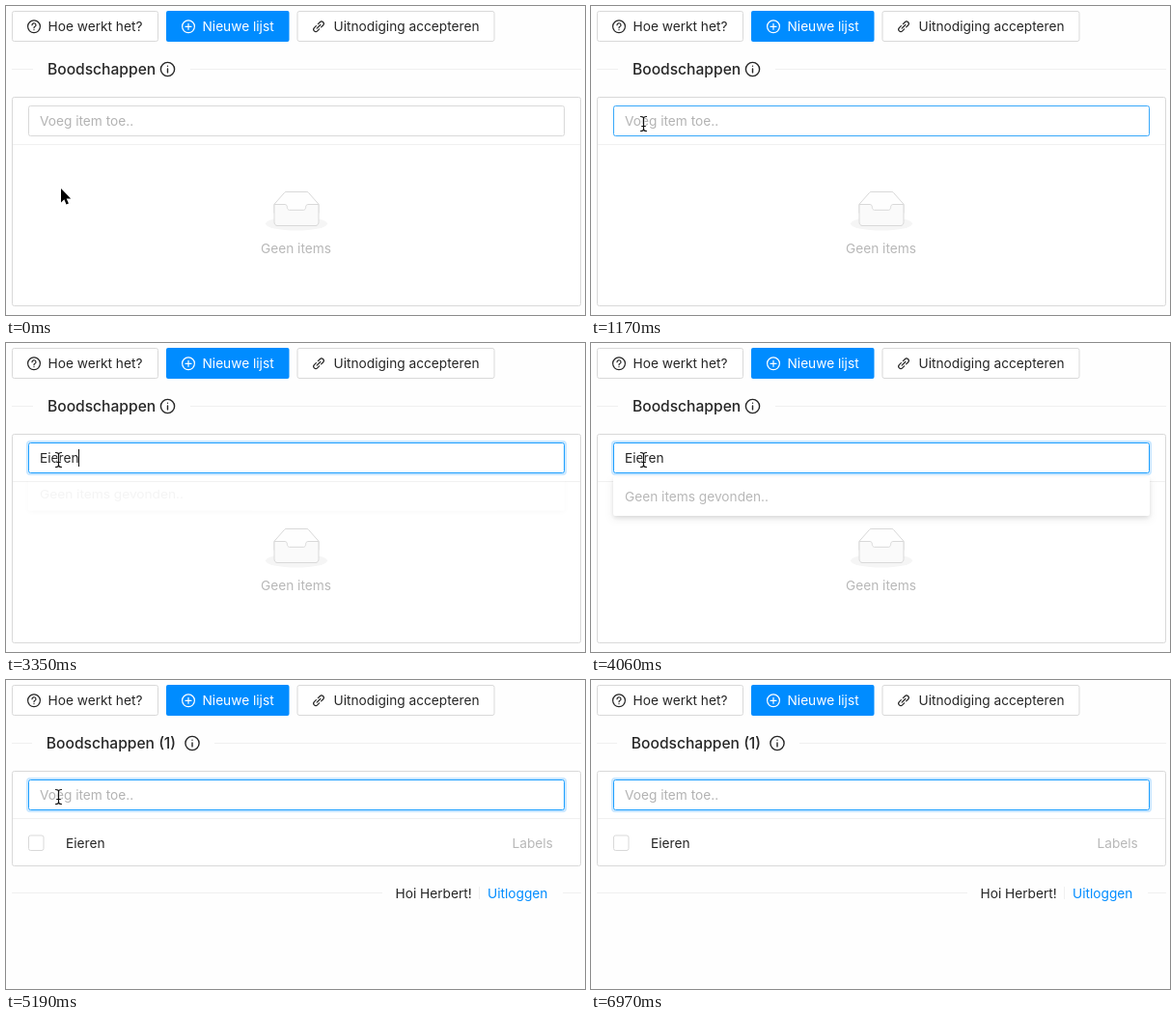
These frames come from a looping animation (600x320 px, 7760 ms). An HTML page:

```html
<!DOCTYPE html>
<html lang="nl">
<head>
<meta charset="utf-8">
<title>Boodschappenlijst</title>
<style>
  html, body { margin: 0; width: 100%; height: 100%; overflow: hidden; background: #fefefe; }
  svg { display: block; width: 600px; height: 320px; }
  text { font: 13.7px Inter, "Open Sans", sans-serif; fill: #262626; white-space: pre; }
  .title { font-size: 15.6px; font-weight: 500; }
  .pale { fill: #b8b8b8; }
  .box { fill: #fff; stroke: #d9d9d9; }
  .rule { stroke: #f0f0f0; fill: none; }
  .icon { fill: none; stroke: #262626; stroke-width: 1.2; stroke-linecap: round; stroke-linejoin: round; }
  #panel { filter: drop-shadow(0 2px 2px rgba(0,0,0,.09)) drop-shadow(0 3px 4px rgba(0,0,0,.08)); }
</style>
</head>
<body>
<svg viewBox="0 0 600 320">
  <rect width="600" height="320" fill="#fefefe"/>

  <!-- toolbar -->
  <rect class="box" x="6.5" y="5.5" width="151" height="31" rx="2"/>
  <g class="icon">
    <circle cx="29" cy="21.3" r="6.4"/>
    <path d="M27 19.8a2 1.9 0 1 1 3 1.5q-1 .5-1 1.5M29 24.6v.1"/>
  </g>
  <text x="43.5" y="26.2">Hoe werkt het?</text>

  <rect x="166" y="5" width="127.5" height="32" rx="2" fill="#008cff"/>
  <g class="icon" style="stroke:#fff">
    <circle cx="189" cy="21.3" r="6.4"/>
    <path d="M186 21.3h6M189 18.3v6"/>
  </g>
  <text x="203.5" y="26.2" style="fill:#fff">Nieuwe lijst</text>

  <rect class="box" x="302" y="5.5" width="204" height="31" rx="2"/>
  <g class="icon" transform="translate(324 21.3) rotate(-45)">
    <path d="M-1.4 -2.3H-4.2a2.3 2.3 0 0 0 0 4.6H-1.4M1.4 -2.3H4.2a2.3 2.3 0 0 1 0 4.6H1.4M-2.6 0H2.6"/>
  </g>
  <text x="339.5" y="26.2">Uitnodiging accepteren</text>

  <!-- list heading -->
  <path id="headRule" class="rule"/>
  <text id="title" class="title" y="71.3"></text>
  <g id="info" class="icon" style="stroke-width:1.4">
    <circle r="7.1"/>
    <path d="M0 -.6V3.4M0 -3.3v.1"/>
  </g>

  <!-- card -->
  <rect id="card" class="box" x="6.5" y="94.5" width="589" rx="2"/>
  <path class="rule" d="M7 143.5H595"/>

  <g id="empty">
    <g transform="translate(269 192.5)">
      <ellipse cx="32" cy="33" rx="32" ry="7" fill="#f5f5f5"/>
      <g stroke="#d9d9d9">
        <path fill="#fefefe" d="M55 12.8L44.9 1.3C44.4.5 43.7 0 42.9 0H21.1c-.7 0-1.5.5-2 1.3L9 12.8V22h46z"/>
        <path fill="#fafafa" d="M41.6 15.9c0-1.6 1-2.9 2.2-2.9H55v18.1C55 33.3 53.7 35 52 35H12c-1.7 0-3-1.7-3-3.9V13h11.2c1.2 0 2.2 1.3 2.2 2.9s1 2.9 2.2 2.9h14.8c1.2 0 2.2-1.3 2.2-2.9z"/>
      </g>
    </g>
    <text class="pale" x="264" y="256.4">Geen items</text>
  </g>

  <g id="filled">
    <rect class="box" x="23.5" y="161" width="15.5" height="15.5" rx="2"/>
    <text x="62" y="173.6">Eieren</text>
    <text class="pale" x="524.5" y="173.6">Labels</text>
    <path class="rule" d="M6 220.5H390M577 220.5H596M490.5 214V227"/>
    <text x="403.5" y="225.6">Hoi Herbert!</text>
    <text x="499" y="225.6" style="fill:#008cff">Uitloggen</text>
  </g>

  <rect id="halo" x="14" y="141" width="575" height="54" rx="15" fill="#f5f5f5"/>
  <g id="halved">
    <path class="rule" d="M7 143.5H14M589 143.5H595"/>
  </g>

  <!-- suggestion panel -->
  <g id="panel">
    <rect x="23" y="139" width="556" height="40" rx="2" fill="#fff"/>
    <text class="pale" x="35" y="164.4">Geen items gevonden..</text>
  </g>

  <!-- input -->
  <rect id="glow" x="22" y="102" width="558" height="34" rx="3" fill="none" stroke="#c9e7ff" stroke-width="2"/>
  <rect id="field" x="23.5" y="103.5" width="555" height="31" rx="2" fill="#fff"/>
  <text id="hint" x="35" y="124.3" style="fill:#b3b3b3">Voeg item toe..</text>
  <text id="typed" x="35" y="124.3"></text>
  <rect id="caret" y="110" width="1" height="18" fill="#111"/>

  <!-- pointers -->
  <g id="arrow">
    <path d="M0 0V14.4L3.3 11.3L5.5 16.4L7.9 15.4L5.7 10.4H10.2Z" stroke="#fff" stroke-width="1.6" stroke-linejoin="round" paint-order="stroke"/>
    <g id="denied" transform="translate(9.3 21.5)" fill="none">
      <circle r="7.6" fill="#eee" stroke="#fff" stroke-width="4.4"/>
      <path d="M-5 -5L5 5" stroke="#888" stroke-width="2.4"/>
      <circle r="7.6" stroke="#888" stroke-width="2.2"/>
    </g>
  </g>
  <g id="beam" fill="none" stroke-linecap="round">
    <path d="M-3 -7.5Q0 -7.5 0 -5.5Q0 -7.5 3 -7.5M0 -5.5V5.5M-3 7.5Q0 7.5 0 5.5Q0 7.5 3 7.5M-1.8 2.5H1.8" stroke="#fff" stroke-width="2.6" opacity=".8"/>
    <path d="M-3 -7.5Q0 -7.5 0 -5.5Q0 -7.5 3 -7.5M0 -5.5V5.5M-3 7.5Q0 7.5 0 5.5Q0 7.5 3 7.5M-1.8 2.5H1.8" stroke="#111" stroke-width="1.2"/>
  </g>
</svg>
<script>
const LOOP = 7760;
const ADDED = 5070;
const FIELD_BOTTOM = 135;
const WORD = 'Eieren';
const KEY_TIMES = [2460, 2640, 2760, 2930, 3050, 3230];
const CARET_ON = [[1460, 1810], [2400, 4060], [4660, 5020]];

const $ = id => document.getElementById(id);
const set = (id, name, value) => $(id).setAttribute(name, value);
const show = (id, on) => set(id, 'visibility', on ? 'visible' : 'hidden');
const place = (id, x, y) => set(id, 'transform', `translate(${x} ${y})`);
const within = (t, [from, to]) => t >= from && t < to;
const clamp = v => Math.min(1, Math.max(0, v));
const lerp = (a, b, p) => a + (b - a) * p;
const step = (t, from, size) => Math.floor((t - from) / size);

function pointer(t) {
  if (t < 720) return [57, 189];
  if (t < 6200) {
    const k = step(t, 720, 56);
    if (k > 8) return [54.5, 121];
    const p = 1 - (1 - (k + .5) / 8.5) ** 2;
    return [lerp(57, 54.5, p), lerp(189, 122, p)];
  }
  if (t < 6920) {
    const p = clamp(step(t, 6200, 60) / 9);
    const e = p * p * (3 - 2 * p);
    return [lerp(57, 472, e), lerp(123, 317, e)];
  }
  return t < 6970 ? [474, 318.5] : [474, 340];
}

function drawPointer(t) {
  const denied = t >= 5020 && t < 5190;
  const [x, y] = denied ? [54, 119.5] : pointer(t);
  const overField = y < FIELD_BOTTOM && !denied;
  show('beam', overField);
  show('arrow', !overField);
  show('denied', denied);
  place('beam', x, y);
  place('arrow', x, y);
}

function drawField(t) {
  const hover = clamp(step(t, 944, 56) / 4);
  const focus = clamp(step(t, 1400, 60) / 2);
  const from = [217, 217, 217], to = [56, 168, 250];
  const rgb = from.map((c, i) => Math.round(lerp(c, to[i], hover)));
  set('field', 'stroke', focus === 1 ? '#1c9fff' : `rgb(${rgb})`);
  set('glow', 'opacity', focus);

  const count = t < ADDED ? KEY_TIMES.filter(k => t >= k).length : 0;
  $('typed').textContent = WORD.slice(0, count);
  show('hint', count === 0);
  const width = count ? $('typed').getComputedTextLength() : 0;
  set('caret', 'x', Math.floor(35 + width));
  show('caret', CARET_ON.some(span => within(t, span)));
}

function drawPanel(t) {
  let scale = 1, opacity = 0;
  if (within(t, [3350, ADDED])) {
    const k = step(t, 3350, 60);
    const left = .13 * .2 ** k;
    scale = k > 2 ? 1 : 1 - left;
    opacity = clamp(1 - .86 * .35 ** k + (k > 2 ? .1 : 0));
  } else if (within(t, [ADDED, 5190])) {
    const k = step(t, ADDED, 60);
    scale = 1 - .06 * k;
    opacity = .8 - .5 * k;
  }
  set('panel', 'transform', `translate(0 139) scale(1 ${scale}) translate(0 -139)`);
  set('panel', 'opacity', opacity);
  show('panel', opacity > 0);
  show('halo', within(t, [5020, ADDED]));
  show('halved', within(t, [5020, ADDED]));
}

function drawList(t) {
  const added = t >= ADDED;
  show('empty', !added);
  show('filled', added);
  set('card', 'height', added ? 98 : 216);
  $('title').textContent = added ? 'Boodschappen (1)' : 'Boodschappen';
  set('title', 'x', added ? 41.8 : 43);
  place('info', added ? 193 : 167.5, 65.5);
  set('headRule', 'd', added ? 'M6 65.5H27M216 65.5H596' : 'M6 65.5H28M191 65.5H596');
}

function draw(t) {
  drawList(t);
  drawField(t);
  drawPanel(t);
  drawPointer(t);
}

const start = performance.now();
function tick() {
  draw((performance.now() - start) % LOOP);
  requestAnimationFrame(tick);
}
tick();
</script>
</body>
</html>
```
